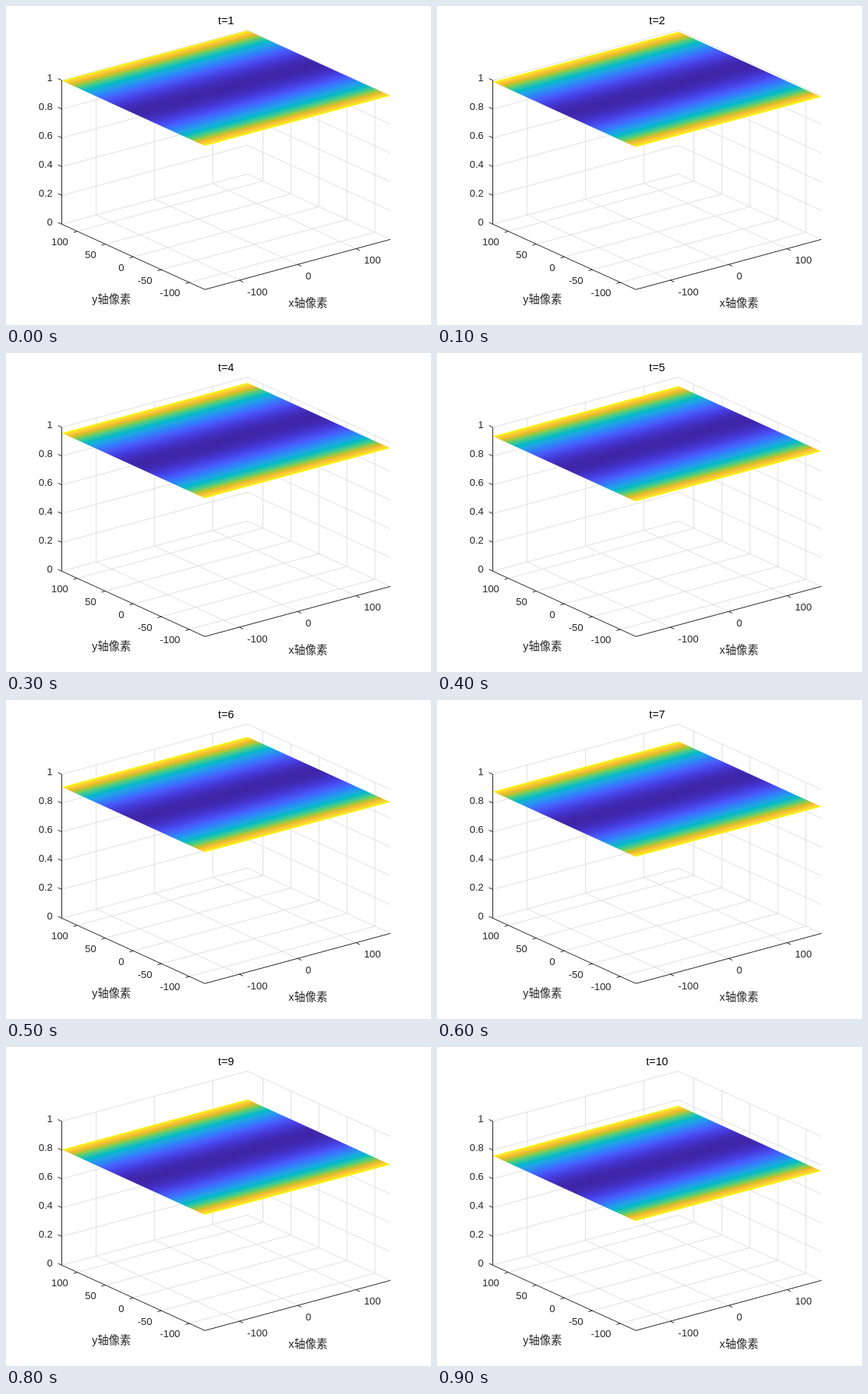
An HTML page with a canvas that plays this animation: 560 by 420 pixels, repeating every 1 s.

```html
<!DOCTYPE html>
<html lang="zh">
<head>
<meta charset="utf-8">
<title>Surface over time</title>
<style>
html, body { margin: 0; width: 100%; height: 100%; overflow: hidden; background: #fff; }
canvas { display: block; }
</style>
</head>
<body>
<canvas id="plot" width="560" height="420"></canvas>
<script>
const ctx = document.getElementById('plot').getContext('2d');
const INK = '#262626', GRID = '#dfdfdf';
const FONT = '"Liberation Sans", Arial, "Noto Sans CJK SC", "Noto Sans CJK", sans-serif';

// Projection: u runs along x, v along y (back to front), z upwards
const O = [73.5, 287.3], U = [244.5, -66], V = [188.5, 86], H = 189.5;
const project = (u, v, z) => [O[0] + u * U[0] + v * V[0], O[1] + u * U[1] + v * V[1] - z * H];
const uOf = x => 0.5 + x / 318;
const vOf = y => 0.5 - y / 255.5;

const X_TICKS = [-100, 0, 100];
const Y_TICKS = [100, 50, 0, -50, -100];
const Z_TICKS = [0, 0.2, 0.4, 0.6, 0.8, 1];

const PARULA = ['3e26a8', '4538d7', '484ff2', '4367fd', '2f80fa', '2797eb', '1caadf', '00b9c7',
  '29c3aa', '48cb86', '81cc59', 'bbc42f', 'eaba30', 'fec735', 'f5e128', 'f9fb15']
  .map(h => [0, 2, 4].map(i => parseInt(h.slice(i, i + 2), 16)));

function parula(s) {
  const p = s * (PARULA.length - 1), i = Math.min(Math.floor(p), PARULA.length - 2);
  const c = PARULA[i].map((a, k) => Math.round(a + (PARULA[i + 1][k] - a) * (p - i)));
  return `rgb(${c})`;
}

const shade = ctx.createLinearGradient(0, 0, 0, 1);
for (let i = 0; i <= 96; i++) shade.addColorStop(i / 96, parula((i / 48 - 1) ** 2));

function line(color, ...pts) {
  ctx.strokeStyle = color;
  ctx.beginPath();
  pts.forEach(p => ctx.lineTo(p[0], p[1]));
  ctx.stroke();
}

function text(str, x, y, align, size = 13.33, color = INK) {
  ctx.font = `${size}px ${FONT}`;
  ctx.fillStyle = color;
  ctx.textAlign = align;
  ctx.fillText(str, x, y);
}

function drawGrid() {
  for (const x of X_TICKS) {
    const u = uOf(x);
    line(GRID, project(u, 1, 0), project(u, 0, 0), project(u, 0, 1));
  }
  for (const y of Y_TICKS) {
    const v = vOf(y);
    line(GRID, project(0, v, 0), project(1, v, 0), project(1, v, 1));
  }
  for (const z of Z_TICKS) line(GRID, project(0, 0, z), project(1, 0, z), project(1, 1, z));
}

function drawSurface(z) {
  const [x, y] = project(0, 0, z);
  ctx.save();
  ctx.transform(U[0], U[1], V[0], V[1], x, y);
  ctx.fillStyle = shade;
  ctx.fillRect(0, 0, 1, 1);
  ctx.restore();
}

function drawAxes() {
  line(INK, project(0, 0, 1), project(0, 0, 0), project(0, 1, 0), project(1, 1, 0));
  for (const z of Z_TICKS) {
    const [x, y] = project(0, 0, z);
    line(INK, [x, y], [x - 5, y - 2.3]);
    text(z, 61.5, y + 1.5, 'right');
  }
  for (const t of Y_TICKS) {
    const [x, y] = project(0, vOf(t), 0);
    line(INK, [x, y], [x - 5, y + 1.4]);
    text(t, x - 12, y + 18.5, 'right');
  }
  for (const t of X_TICKS) {
    const [x, y] = project(uOf(t), 1, 0);
    line(INK, [x, y], [x + 5, y + 2.3]);
    text(t, x + 10.5, y + 19.5, 'left');
  }
  text('y轴像素', 139, 391, 'center', 14.67);
  text('x轴像素', 398, 396, 'center', 14.67);
}

function draw(t) {
  ctx.fillStyle = '#fff';
  ctx.fillRect(0, 0, 560, 420);
  ctx.lineWidth = 1;
  drawGrid();
  drawAxes();
  drawSurface(Math.cos(0.0707 * t));
  text('t=' + t, 290, 24, 'center', 14.67, '#000');
}

const start = performance.now();
function tick() {
  const ms = (performance.now() - start) % 1000;
  draw(1 + Math.floor(ms / 100));
  requestAnimationFrame(tick);
}
tick();
</script>
</body>
</html>
```
